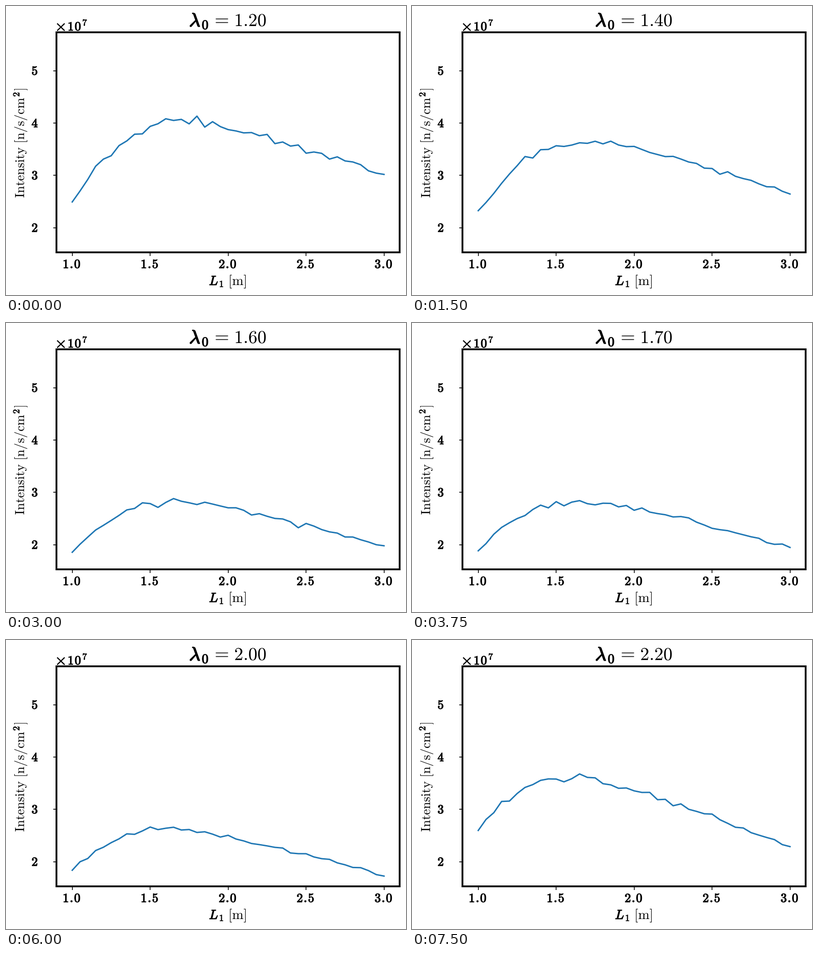
These frames come from a looping animation (880 by 637 pixels, 8000 ms). A matplotlib script:

```python
import numpy as np
import matplotlib.pyplot as plt
from matplotlib.animation import FuncAnimation
from matplotlib.patches import Circle, PathPatch, Rectangle
from matplotlib.textpath import TextPath
from matplotlib.transforms import Affine2D

W, H, DPI = 880, 637, 100
PT = 72 / DPI  # points per pixel
STEP = 3       # animation frames per wavelength

plt.rcParams["mathtext.fontset"] = "cm"
fig = plt.figure(figsize=(W / DPI, H / DPI), dpi=DPI, facecolor="white")
ax = fig.add_axes([0, 0, 1, 1])
ax.set_xlim(-0.5, W - 0.5)
ax.set_ylim(H - 0.5, -0.5)
ax.axis("off")


def px(length):
    return 145.2 + 343 * (length - 1)


def py(intensity):
    return 488 - 115.3 * (intensity - 2)


# --- text -------------------------------------------------------------

def glyphs(text, size, angle=0):
    turn = Affine2D().rotate_deg(angle).scale(1, -1)
    return turn.transform_path(TextPath((0, 0), f"${text}$", size=size))


def shift(path, dx, dy):
    return Affine2D().translate(dx, dy).transform_path(path)


def ink(path, stroke=0):
    return ax.add_patch(PathPatch(path, facecolor="black", edgecolor="black",
                                  linewidth=stroke * PT, joinstyle="round"))


def label(text, size, cx, cy, bold=False, angle=0):
    """Place text with the middle of its ink at (cx, cy)."""
    path = glyphs(text, size, angle)
    box = path.get_extents()
    ink(shift(path, cx - (box.x0 + box.x1) / 2, cy - (box.y0 + box.y1) / 2),
        0.047 * size if bold else 0)


def digit(d, cx, cy, size=27.5, angle=0):
    label(rf"\mathrm{{{d}}}", size, cx, cy, bold=True, angle=angle)


def segment(x0, y0, x1, y1, width):
    ax.plot([x0, x1], [y0, y1], color="black", lw=width * PT,
            solid_capstyle="butt")


# --- axes -------------------------------------------------------------

ax.add_patch(Rectangle((110.5, 57.5), 755, 485, fill=False,
                       edgecolor="black", linewidth=4 * PT))

for name in ("1.0", "1.5", "2.0", "2.5", "3.0"):
    x = px(float(name))
    segment(x, 543, x, 550.5, 1.7)
    digit(name[0], x - 14, 568)
    digit(name[2], x + 11, 568)
    ax.add_patch(Circle((x - 1.6, 575.4), 2.3, color="black", lw=0))

for value in range(2, 6):
    segment(103.5, py(value), 111, py(value), 1.7)
    digit(value, 62.5, py(value))

segment(112, 38, 128.5, 54, 2.5)
segment(112, 54, 128.5, 38, 2.5)
digit(1, 142, 44.3)
digit(0, 157.5, 44.3)
digit(7, 172.8, 36, 20)

label("L", 29, 456, 604.5, bold=True)
digit(1, 473.5, 612, 20)
label(r"\mathrm{[m]}", 30, 509.5, 607)

label(r"\mathrm{Intensity\ [n/s/cm}", 28.7, 32, 312, angle=90)
digit(2, 22, 194.5, 20, angle=90)
label(r"\mathrm{]}", 28.7, 32, 184, angle=90)

label(r"\lambda", 42, 415, 30, bold=True)
digit(0, 437.5, 41, 29)
label("=", 41, 474.5, 32)
number = ink(glyphs("0", 40))


# --- curves -----------------------------------------------------------

PEAKS = (4.05, 3.83, 3.66, 3.68, 2.83, 2.83, 2.65, 2.38, 2.64, 3.08, 3.63)
lams = 1.2 + 0.1 * np.arange(len(PEAKS))
length = np.linspace(1, 3, 41)
rng = np.random.default_rng(4)


def curve(lam, peak):
    """Steep rise to a peak, slower fall, and counting noise between ends."""
    top = 1.75 - 0.14 * (lam - 1.2)
    rise = np.clip((top - length) / (top - 1), 0, 1)
    fall = np.clip((length - top) / (3 - top), 0, 1)
    first = 0.615 + 0.1 * (lam - 1.2)
    last = 0.745 - 0.115 * (lam - 1.2)
    shape = 1 - (1 - first) * rise ** 2.3 - (1 - last) * fall ** 1.25
    noise = np.pad(rng.normal(0, 0.011, len(length) - 2), 1)
    return py(peak * shape * (1 + noise))


curves = [curve(lam, peak) for lam, peak in zip(lams, PEAKS)]
titles = [shift(glyphs(rf"\mathrm{{{lam:.2f}}}", 40), 501.5, 43.8)
          for lam in lams]
line, = ax.plot(px(length), curves[0], color="#1f77b4", lw=3.1 * PT)


def update(frame):
    k = frame // STEP
    line.set_ydata(curves[k])
    number.set_path(titles[k])
    return line, number


anim = FuncAnimation(fig, update, frames=32, interval=250, repeat=True,
                     repeat_delay=0)
plt.show()
```
